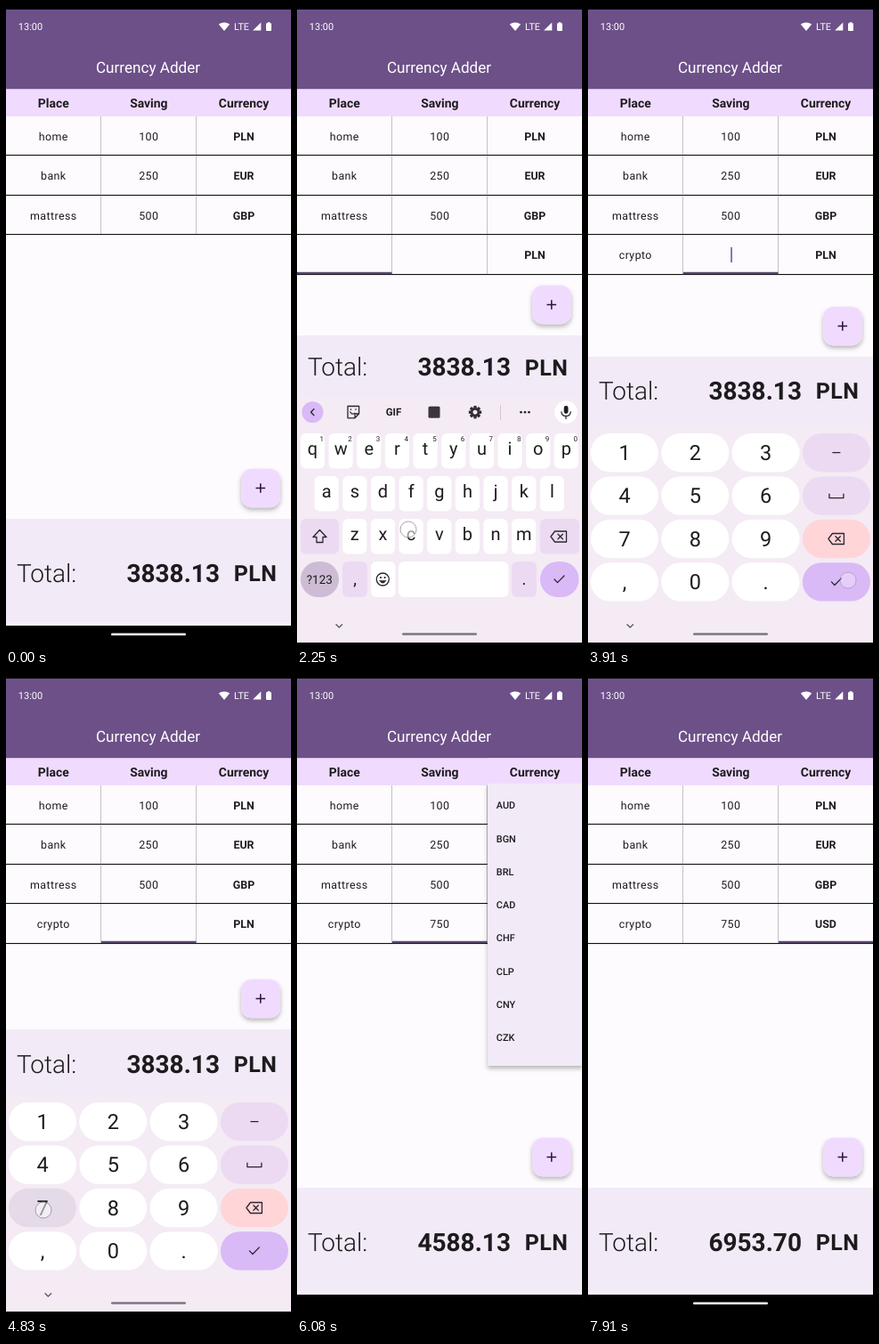
An HTML page for the animation above (8 s loop, 320 px wide and 720 px high).

```html
<!DOCTYPE html>
<html lang="en">
<head>
<meta charset="utf-8">
<title>Currency Adder</title>
<style>
html, body { margin: 0; width: 100%; height: 100%; overflow: hidden; background: #000; }
svg { display: block; width: 320px; height: 720px; }
text { font-family: Roboto, sans-serif; fill: #1d1b1e; text-anchor: middle; text-rendering: geometricPrecision; white-space: pre; }
.cell { font-size: 12.45px; letter-spacing: .39px; }
.line { fill: none; stroke: #2b2630; stroke-width: 1.3; stroke-linecap: round; stroke-linejoin: round; }
</style>
</head>
<body>
<svg id="stage" viewBox="0 0 320 720" xmlns="http://www.w3.org/2000/svg">
  <defs>
    <filter id="soft" x="-40%" y="-40%" width="180%" height="190%">
      <feDropShadow dx="0" dy="3" stdDeviation="2.6" flood-color="#000" flood-opacity=".28"/>
    </filter>
    <clipPath id="menuClip"><rect x="214" y="122" width="106" height="317"/></clipPath>
  </defs>
</svg>
<script>
const LOOP = 8000;
const INK = '#1d1b1e', LILAC = '#f0dbff', PANEL = '#f2eaf6', KB = '#f4ebf5', TINT = '#ecdaf2', ACCENT = '#d9b9f6';
const svg = document.getElementById('stage');

function add(parent, tag, attrs, text) {
  const el = document.createElementNS('http://www.w3.org/2000/svg', tag);
  for (const k in attrs) el.setAttribute(k, attrs[k]);
  if (text !== undefined) el.textContent = text;
  parent.appendChild(el);
  return el;
}
const group = (p, a) => add(p, 'g', a || {});
const rect = (p, x, y, width, height, fill, rx = 0) => add(p, 'rect', { x, y, width, height, fill, rx });
const circle = (p, cx, cy, r, fill) => add(p, 'circle', { cx, cy, r, fill });
const path = (p, d, a) => add(p, 'path', Object.assign({ d, class: 'line' }, a));
const label = (p, x, y, s, size, a) => add(p, 'text', Object.assign({ x, y, 'font-size': size }, a), s);
const cell = (p, x, y, s) => add(p, 'text', { x, y, class: 'cell' }, s);
const bold = { 'font-weight': 700 };

const set = (el, k, v) => el.setAttribute(k, v);
const show = (el, on) => set(el, 'visibility', on ? 'inherit' : 'hidden');
const clamp = v => Math.max(0, Math.min(1, v));
const span = (t, a, b) => clamp((t - a) / (b - a));
const out = v => 1 - (1 - v) ** 3;
const mix = (a, b, v) => a + (b - a) * v;
const between = (t, a, b) => t >= a && t < b;
const COLS = [53.3, 160.3, 267];
const rowBase = i => 150.6 + 44.45 * i;

// Page and header
rect(svg, 0, 0, 320, 720, '#fdfbfe');
rect(svg, 0, 0, 320, 93.5, '#6d5088');
rect(svg, 0, 93.5, 320, 30.5, LILAC);
label(svg, 159.5, 74.5, 'Currency Adder', 17.1, { style: 'fill:#fff' });
label(svg, 27.5, 27.3, '13:00', 11, { style: 'fill:#fff' });
label(svg, 264.5, 27.3, 'LTE', 10.8, { style: 'fill:#fff' });
path(svg, 'M238.8 20.6Q245 16.4 251.2 20.6L245 28Z', { style: 'fill:#fff;stroke:none' });
path(svg, 'M286.3 18.5V27.6H277.2Z', { style: 'fill:#fff;stroke:none' });
rect(svg, 292, 19.3, 6, 8.7, '#fff', 1);
rect(svg, 293.7, 18.2, 2.6, 2, '#fff');
['Place', 'Saving', 'Currency'].forEach((s, i) => label(svg, COLS[i], 114, s, 13.9, bold));

// Table
function addRow(i, place, saving, code) {
  const g = group(svg), y = rowBase(i);
  for (const x of [106, 213]) rect(g, x, 124 + 44.4 * i, 1, 44, '#c4c0c6');
  rect(g, 0, Math.round(167.3 + 44.45 * i), 320, 1.1, '#111');
  return { g, place: cell(g, COLS[0], y, place), saving: cell(g, COLS[1], y, saving),
    code: label(g, COLS[2], y, code, 12.45, bold) };
}
addRow(0, 'home', '100', 'PLN');
addRow(1, 'bank', '250', 'EUR');
addRow(2, 'mattress', '500', 'GBP');
const row = addRow(3, '', '', 'PLN');
const focus = rect(svg, 0, 298.8, 106.5, 2.3, '#5d4b70');
const caret = rect(svg, 53, 271, 1.5, 17, '#6d4a92');

// Total panel and add button
const panel = rect(svg, 0, 576, 320, 150, PANEL);
const sum = group(svg);
label(sum, 12, 9.5, 'Total:', 28, { 'font-weight': 300, style: 'text-anchor:start' });
const total = label(sum, 187.7, 9.5, '', 28, bold);
label(sum, 280, 8.8, 'PLN', 25, { 'font-weight': 700, 'letter-spacing': .4 });
const fab = group(svg);
const fabBox = add(fab, 'rect', { x: 264, y: -21.8, width: 44, height: 43.6, rx: 12, fill: LILAC, filter: 'url(#soft)' });
path(fab, 'M280.5 0H291.1M285.8 -5.3V5.3', { style: 'stroke:#2c1240;stroke-width:1.5;stroke-linecap:butt' });
rect(svg, 0, 692, 320, 4, '#f6f1f9');
rect(svg, 0, 696, 320, 24, '#000');
const pill = rect(svg, 118, 704.5, 84, 2.4, '#fff', 1.2);

// Shared keyboard glyphs
function backspace(p, x, y) {
  path(p, `M${x - 9} ${y}L${x - 4.5} ${y - 6}H${x + 8.5}V${y + 6}H${x - 4.5}ZM${x - 1} ${y - 2.7}L${x + 4.4} ${y + 2.7}M${x + 4.4} ${y - 2.7}L${x - 1} ${y + 2.7}`);
}
const check = (p, x, y) => path(p, `M${x - 5.5} ${y}L${x - 2} ${y + 3.6}L${x + 5.5} ${y - 4}`);
function kbBase(top) {
  const g = group(svg);
  rect(g, 0, top, 320, 720 - top, KB);
  path(g, 'M44 694.8L47.3 698L50.6 694.8', { style: 'stroke:#5d5663' });
  rect(g, 118, 704.3, 84, 2.5, '#7d7681', 1.2);
  return g;
}

// Letter keyboard
const abc = kbBase(438.5), keys = {};
function letters(s, x0, top) {
  [...s].forEach((c, i) => {
    const x = x0 + 31.65 * i;
    rect(abc, x - 13.6, top, 27.2, 39.5, '#fff', 6);
    keys[c] = { x, y: top + 20, el: label(abc, x, top + 24.3, c, 20) };
    if (top === 480) label(abc, x + 10.3, 488.6, (i + 1) % 10, 8);
  });
}
letters('qwertyuiop', 17.5, 480);
letters('asdfghjkl', 33.2, 528);
letters('zxcvbnm', 64.8, 576);
rect(abc, 4, 576, 43, 39.5, TINT, 6);
path(abc, 'M25.5 588.5L33 596.5H29V602.5H22V596.5H18Z');
rect(abc, 273, 576, 44, 39.5, TINT, 6);
backspace(abc, 294, 596);
rect(abc, 4, 624, 43, 40, '#cebcd5', 20);
label(abc, 25.3, 648.5, '?123', 13.5);
rect(abc, 51, 624, 28, 40, TINT, 6);
label(abc, 65, 650, ',', 19);
rect(abc, 83, 624, 27.5, 40, '#fff', 6);
circle(abc, 96.3, 644, 7, 'none').setAttribute('class', 'line');
circle(abc, 94, 642, 1.1, INK);
circle(abc, 98.6, 642, 1.1, INK);
path(abc, 'M92.6 645.6Q96.3 651 100 645.6Z', { style: 'fill:#2b2630;stroke-width:.6' });
rect(abc, 114, 624, 123.5, 40, '#fff', 6);
rect(abc, 241, 624, 28, 40, TINT, 6);
label(abc, 255, 650, '.', 19);
const enter = rect(abc, 273, 624, 43.5, 40, ACCENT, 20);
check(abc, 294.5, 644);

circle(abc, 17.5, 456.3, 12, ACCENT);
const arrow = path(abc, '');
circle(abc, 302, 456.3, 12.8, '#fff');
rect(abc, 299.7, 449, 4.8, 9, INK, 2.4);
path(abc, 'M296.9 456Q297.2 460.6 302 460.7Q306.9 460.6 307.2 456M302 461V463.5');

// Tool strip
const tools = group(abc);
path(tools, 'M57 449.5H69.6V458L65 462.8H57ZM65 462.8V458H69.6M59.8 456Q61.5 459.3 64.6 457.5M60.5 453V453.4M66 453V453.4');
label(tools, 108.5, 460.3, 'GIF', 11.5, bold);
rect(tools, 147.5, 449.8, 13, 13, '#3b3540', 1.5);
const gear = group(tools, { transform: 'translate(200 456.3)' });
for (let i = 0; i < 4; i++) add(gear, 'rect', { x: -1.7, y: -7.2, width: 3.4, height: 14.4, rx: .8, fill: '#332e38', transform: `rotate(${i * 45})` });
add(gear, 'circle', { r: 3.8, fill: KB, stroke: '#332e38', 'stroke-width': 2.6 });
rect(tools, 228, 448, 1, 17, '#d3c8d6');
for (const x of [251.5, 256, 260.5]) circle(tools, x, 456.3, 1.3, INK);

// Word strip
const words = group(abc);
const hints = [74, 160, 245].map((x, i) => label(words, x, 460.8, '', 14, i === 1 ? bold : {}));
for (const x of [114, 204]) rect(words, x, 448, 1, 17, '#d3c8d6');

const bubble = group(abc);
add(bubble, 'circle', { r: 22.3, fill: '#fff', filter: 'url(#soft)' });
const bubbleText = label(bubble, 0, 7, '', 22);
for (const x of [-3, 0, 3]) circle(bubble, x, 15.7, .8, INK);

// Number keyboard
const num = kbBase(472), pads = {};
['123–', '456_', '789<', ',0.>'].forEach((line, r) => [...line].forEach((c, i) => {
  const x = 3 + 79.3 * i, y = 480 + 48.4 * r, cx = x + 38, cy = y + 21.7;
  const fill = i < 3 ? '#fff' : [TINT, TINT, '#ffd5d8', ACCENT][r];
  pads[c] = rect(num, x, y, 76, 43.4, fill, 21.7);
  if (i < 3) label(num, cx, cy + 8.3, c, 23.5);
  else if (r === 0) path(num, `M${cx - 4} ${cy}H${cx + 4}`);
  else if (r === 1) path(num, `M${cx - 8} ${cy - 2}V${cy + 2.5}H${cx + 8}V${cy - 2}`);
  else if (r === 2) backspace(num, cx, cy);
  else check(num, cx, cy);
}));

// Currency menu
const STEP = 37.25;
const codes = 'AUD BGN BRL CAD CHF CLP CNY CZK DKK EUR GBP HKD HUF IDR ILS INR ISK JPY KRW MXN MYR NOK NZD PHP PLN RON RUB SEK SGD THB TRY UAH USD ZAR'.split(' ');
const maxScroll = codes.length * STEP + 12 - 317;
const menu = group(svg);
const menuBox = add(menu, 'rect', { x: 214, y: 122, width: 107, height: 317, fill: PANEL, filter: 'url(#soft)' });
const menuList = group(group(menu, { 'clip-path': 'url(#menuClip)' }));
codes.forEach((c, i) => label(menuList, 223.8, 150.3 + STEP * i, c, 10.9, { 'font-weight': 500, style: 'text-anchor:start' }));
// Keep the menu's shadow below the header band
rect(menu, 214, 93.5, 106, 28.5, LILAC);
label(menu, COLS[2], 114, 'Currency', 13.9, bold);

rect(svg, 0, 0, 320, 4, '#000');
rect(svg, 0, 715, 320, 5, '#000');

const dots = [0, 1].map(() => add(svg, 'circle', { r: 9, fill: '#fff', 'fill-opacity': .55, stroke: '#8d8592', 'stroke-opacity': .75, 'stroke-width': 1 }));

// Touches: start, end, x, y, key
const taps = [
  [740, 900, 287, 544], [1330, 1510, 68.5, 291],
  [2230, 2350, 125, 588, 'c'], [2490, 2570, 113, 511, 'r'], [2700, 2780, 176, 511, 'y'], [2920, 3010, 291, 512, 'p'],
  [3120, 3240, 145, 512, 't'], [3370, 3440, 271, 511, 'o'], [3610, 3830, 292, 645],
  [4790, 4920, 42, 601, '7'], [5070, 5160, 120, 555, '5'], [5290, 5370, 121, 650, '0'],
  [5500, 5820, 278, 283], [6440, 6560, 262, 378]
];
const typed = (t, from, to) => taps.filter(k => k[4] && k[0] >= from && k[0] < to && t >= k[1]).map(k => k[4]).join('');
const guesses = { c: 'can come', cr: 'crazy cry', cry: 'crying cryo', cryp: 'crypto cryo', crypt: 'crypto crypts', crypto: 'crypto cryptos' };
// Panel top and centre of its text
const IDLE = [576, 637.5], ABC = [370, 405.8], NUM = [398, 437];

function draw(t) {
  const up = out(span(t, 1600, 1900)), swap = out(span(t, 3830, 4000)), down = out(span(t, 5830, 6000));
  const [top, mid] = IDLE.map((v, i) => mix(mix(mix(v, ABC[i], up), NUM[i], swap), v, down));
  set(panel, 'y', top);
  set(sum, 'transform', `translate(0 ${mid})`);
  set(fab, 'transform', `translate(0 ${top - 34.5})`);
  const press = span(t, 770, 900) * (1 - span(t, 1520, 1750));
  set(fabBox, 'fill', `rgb(${mix(240, 226, press)} ${mix(219, 202, press)} ${mix(255, 242, press)})`);

  // New row
  const word = typed(t, 2000, 4000), digits = typed(t, 4500, 5450);
  show(row.g, t >= 980);
  row.place.textContent = word;
  set(row.place, 'text-decoration', word && t < 3830 ? 'underline' : 'none');
  row.saving.textContent = digits;
  row.code.textContent = t < 6600 ? 'PLN' : 'USD';
  total.textContent = t >= 7000 ? '6953.70' : (3838.13 + Number(digits)).toFixed(2);
  const col = t < 3830 ? 0 : t < 6560 ? 1 : 2;
  show(focus, t >= 1420);
  set(focus, 'x', [0, 107, 214][col]);
  set(focus, 'fill', t < 1580 ? '#8d8592' : '#5d4b70');
  set(focus, 'height', t < 1580 ? 1.4 : 2.3);
  const textEl = col ? row.saving : row.place;
  show(caret, between(t, 1420, 1950) || between(t, 2350, 4410) || between(t, 4920, 5830));
  set(caret, 'x', COLS[col ? 1 : 0] + (textEl.textContent ? textEl.getComputedTextLength() / 2 : 0));

  // Keyboards
  show(abc, between(t, 1600, 3850));
  set(abc, 'transform', `translate(0 ${(1 - up) * 282})`);
  show(tools, !word);
  show(words, word);
  set(arrow, 'd', word ? 'M16 452.8L19.4 456.3L16 459.8' : 'M19 452.8L15.6 456.3L19 459.8');
  const g = (guesses[word] || ' ').split(' ');
  [word, g[0], g[1]].forEach((s, i) => { hints[i].textContent = s; });
  set(enter, 'fill', t >= 3820 ? '#c5a5e2' : ACCENT);
  show(num, between(t, 3850, 6000));
  set(num, 'transform', `translate(0 ${down * 248})`);

  // Pressed keys
  const hit = taps.find(k => k[4] && between(t, k[0] + 20, k[1] + 20));
  const key = hit && t > hit[0] + 28 ? keys[hit[4]] : null;
  for (const c in keys) set(keys[c].el, 'opacity', keys[c] === key ? .35 : 1);
  show(bubble, key);
  if (key) {
    set(bubble, 'transform', `translate(${key.x} ${key.y - 46.5})`);
    bubbleText.textContent = hit[4];
  }
  for (const c of '750') set(pads[c], 'fill', hit && hit[4] === c ? '#e5dae8' : '#fff');

  // Menu
  const open = out(span(t, 5900, 6050));
  show(menu, between(t, 5900, 6580));
  set(menu, 'opacity', open * (1 - span(t, 6500, 6580)));
  set(menuBox, 'height', 317 * mix(.5, 1, open));
  set(menuList, 'transform', `translate(0 ${-maxScroll * out(span(t, 6130, 6420))})`);
  show(pill, !between(t, 5900, 6620));

  // Touch dots
  const live = taps.filter(k => between(t, k[0], k[1] + 190)).slice(-2);
  dots.forEach((d, i) => {
    const k = live[i];
    show(d, k);
    if (!k) return;
    set(d, 'cx', k[2]);
    set(d, 'cy', k[3]);
    set(d, 'opacity', 1 - span(t, k[1], k[1] + 190));
  });
}

const start = performance.now();
function tick() {
  draw((performance.now() - start) % LOOP);
  requestAnimationFrame(tick);
}
tick();
</script>
</body>
</html>
```
